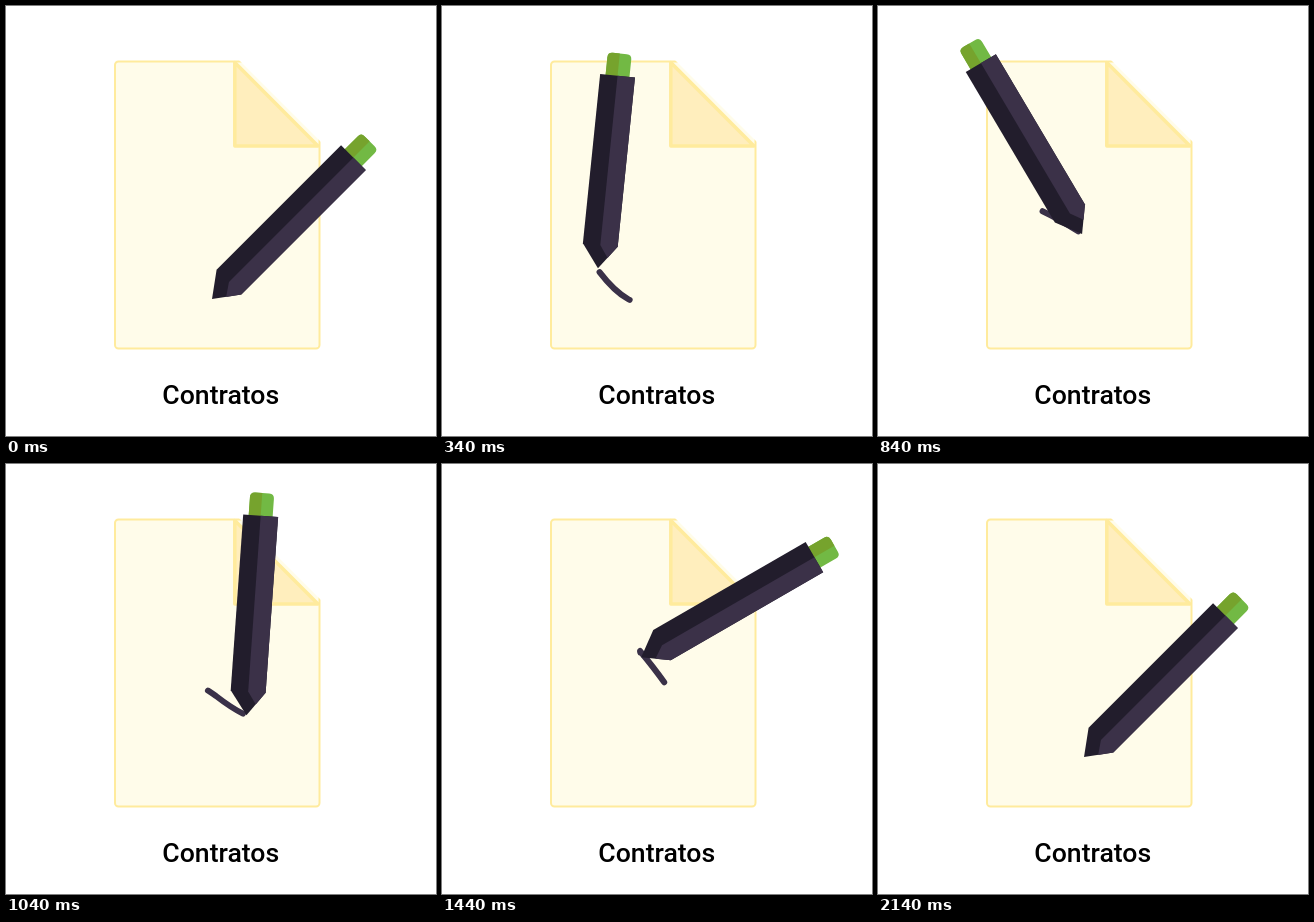
Write an HTML page that moves like this. It is 430 px wide and 430 px high and loops after 3.36 s.

```html
<!DOCTYPE html>
<html lang="es">
<head>
<meta charset="utf-8">
<title>Contratos</title>
<style>
  html, body { margin: 0; width: 100%; height: 100%; overflow: hidden; background: #fff; }
  svg { display: block; width: 100%; height: 100%; }
  text { font: 500 26.6px Roboto, Arial, sans-serif; text-anchor: middle; }
</style>
</head>
<body>
<svg viewBox="0 0 430 430">
  <g stroke="#ffeb9d" stroke-linejoin="round">
    <rect x="109" y="55.5" width="204.5" height="287" rx="3.5" fill="#fffcea" stroke-width="2"/>
    <path d="M229 50H318V139Z" fill="#fff" stroke="none"/>
    <path d="M228.800 56.500V140H312Z" fill="#ffeebd" stroke-width="3.500"/>
  </g>
  <path id="trail" pathLength="1" fill="none" stroke="#3a3148" stroke-width="6"
    stroke-linecap="round" stroke-linejoin="round"
    d="M206 293Q198 300 186 293Q172 285 157.500 266C150 250 152 222 162 204Q184 214 210 232
       Q228 246 242 252Q232 228 198 187Q203 214 219 261Q218 280 206 293"/>
  <!-- The pen stands upright with its tip at the origin. -->
  <g id="pen">
    <path fill="#72b944" d="M-12 -198V-218Q-12 -223 -7 -223H7Q12 -223 12 -218V-198Z"/>
    <path fill="#76a32d" d="M-12 -198V-218Q-12 -223 -7 -223H0V-198Z"/>
    <path fill="#221d2c" d="M0 0L-17.500 -24V-200H17.500V-24Z"/>
    <path fill="#3b3148" d="M0 -24V-200H17.500V-24L8.500 -11.500Z"/>
  </g>
  <text x="214.800" y="398">Contratos</text>
</svg>
<script>
const LOOP = 3360, STROKE_TIME = 1890;
const PEN_START = 40, HEAD_START = 60, TAIL_START = 250;
const pen = document.getElementById('pen'), trail = document.getElementById('trail');
const trailLength = trail.getTotalLength();

// Time and tilt in degrees.
const tilts = [[0, 45], [680, -33], [780, -33], [1380, 60], [1660, 60], [1940, 45]];

const clamp = v => Math.min(1, Math.max(0, v));
const easeInOut = u => (1 - Math.cos(Math.PI * u)) / 2;
const progress = (t, start) => clamp((t - start) / STROKE_TIME);

function tiltAt(t) {
  let tilt = tilts[0][1];
  for (let i = 1; i < tilts.length; i++) {
    const [t0, from] = tilts[i - 1], [t1, to] = tilts[i];
    tilt += (to - from) * easeInOut(clamp((t - t0) / (t1 - t0)));
  }
  return tilt;
}

// The pen looks shorter while it leans away from the viewer.
const foreshortening = t => 1 - 0.08 * Math.exp(-(((t - 530) / 200) ** 2));

function drawPen(t) {
  const { x, y } = trail.getPointAtLength(progress(t, PEN_START) * trailLength);
  pen.setAttribute('transform',
    `translate(${x} ${y}) rotate(${tiltAt(t)}) scale(1 ${foreshortening(t)})`);
}

function drawTrail(t) {
  const head = progress(t, HEAD_START), tail = progress(t, TAIL_START);
  trail.style.visibility = head > tail ? 'visible' : 'hidden';
  trail.style.strokeDasharray = `${head - tail} 2`;
  trail.style.strokeDashoffset = -tail;
}

const start = performance.now();

function draw() {
  const t = (performance.now() - start) % LOOP;
  drawPen(t);
  drawTrail(t);
  requestAnimationFrame(draw);
}
draw();
</script>
</body>
</html>
```
